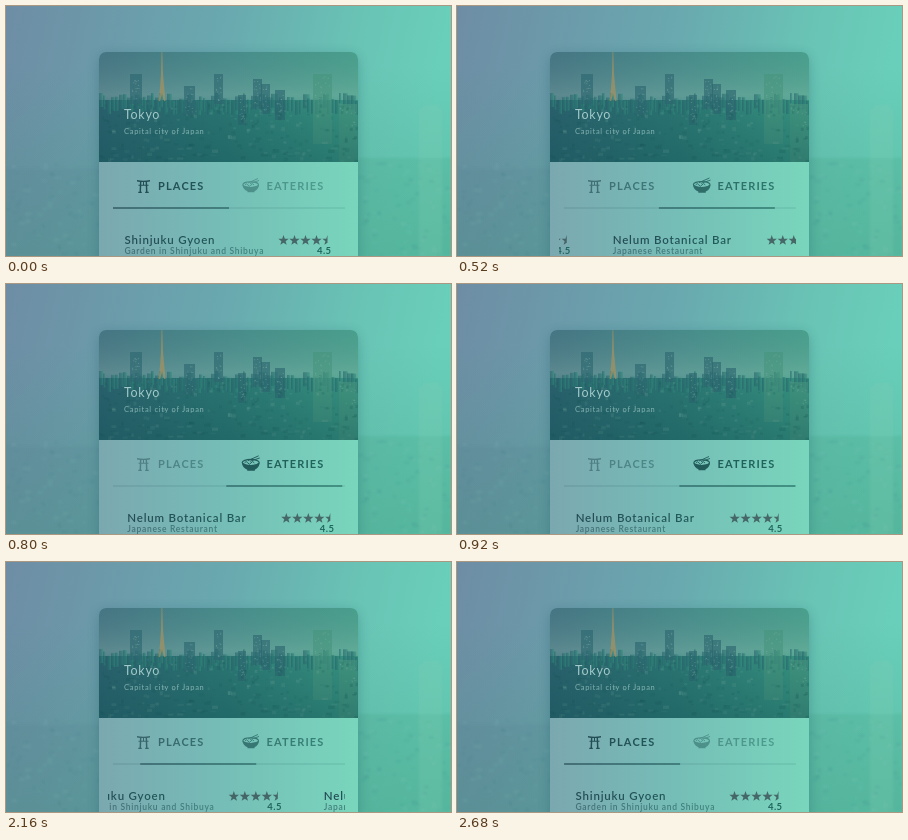
Animation, 445 px wide and 250 px high, one loop 2960 ms. Source, as an HTML page:

```html
<!DOCTYPE html>
<html lang="en">
<head>
<meta charset="utf-8">
<title>City card</title>
<style>
html, body { margin: 0; width: 100%; height: 100%; overflow: hidden; background: #6aa9af }
svg { display: block; width: 445px; height: 250px; font-family: Lato, sans-serif }
.ink { fill: url(#ink) }
.stroke { fill: none; stroke: url(#ink) }
.tab { font-size: 11px; font-weight: 700; letter-spacing: 1.15px }
.title { font-size: 11.5px; font-weight: 600; letter-spacing: .8px }
.sub { font-size: 8.5px; font-weight: 600; letter-spacing: .7px; opacity: .62 }
.score { font-size: 9.5px; font-weight: 700; letter-spacing: .4px }
</style>
</head>
<body>
<svg viewBox="0 0 445 250">
  <defs>
    <linearGradient id="back" x2="1" y2=".12">
      <stop stop-color="#6e8da5"/><stop offset=".5" stop-color="#69a9af"/>
      <stop offset=".8" stop-color="#69c4b5"/><stop offset="1" stop-color="#69cfba"/>
    </linearGradient>
    <linearGradient id="mist" x2="0" y2="1">
      <stop stop-color="#358c70" stop-opacity="0"/><stop offset="1" stop-color="#358c70" stop-opacity=".28"/>
    </linearGradient>
    <linearGradient id="body">
      <stop stop-color="#7ba8b0"/><stop offset=".5" stop-color="#75beb7"/><stop offset="1" stop-color="#79d6bc"/>
    </linearGradient>
    <linearGradient id="ink" gradientUnits="userSpaceOnUse" x1="93" x2="352">
      <stop stop-color="#244753"/><stop offset="1" stop-color="#1f6a5f"/>
    </linearGradient>
    <linearGradient id="sky">
      <stop stop-color="#4a7786"/><stop offset=".5" stop-color="#4d918f"/><stop offset="1" stop-color="#4fa891"/>
    </linearGradient>
    <linearGradient id="glow" x2="0" y2="1">
      <stop stop-color="#2a6a70" stop-opacity=".15"/><stop offset=".85" stop-color="#86aea4" stop-opacity=".3"/>
      <stop offset="1" stop-color="#86aea4" stop-opacity=".2"/>
    </linearGradient>
    <linearGradient id="ground">
      <stop stop-color="#2a606c"/><stop offset=".5" stop-color="#2b7673"/><stop offset="1" stop-color="#389480"/>
    </linearGradient>
    <linearGradient id="shade" x2="0" y2="1">
      <stop stop-color="#0f5054" stop-opacity="0"/><stop offset="1" stop-color="#0f5054" stop-opacity=".35"/>
    </linearGradient>
    <filter id="soft" x="-20%" y="-20%" width="140%" height="140%"><feGaussianBlur stdDeviation="6"/></filter>
    <filter id="haze"><feGaussianBlur stdDeviation=".8"/></filter>
    <filter id="blend"><feGaussianBlur stdDeviation=".5"/></filter>
    <clipPath id="photo"><path d="M93 156V53a7 7 0 0 1 7-7H345a7 7 0 0 1 7 7V156z"/></clipPath>
    <clipPath id="view"><path d="M102 205H339V250H102z"/></clipPath>
  </defs>

  <path fill="url(#back)" d="M0 0H445V250H0z"/>
  <path fill="url(#mist)" d="M0 60H445V250H0z"/>
  <g id="far" filter="url(#haze)"></g>
  <rect x="93" y="49" width="259" height="230" rx="7" fill="#1f5663" opacity=".32" filter="url(#soft)"/>
  <rect x="93" y="46" width="259" height="230" rx="7" fill="url(#body)"/>

  <g clip-path="url(#photo)">
    <path fill="url(#sky)" d="M93 46H352V156H93z"/>
    <path fill="url(#glow)" d="M93 46H352V96H93z"/>
    <path fill="url(#ground)" d="M93 94H352V156H93z"/>
    <g id="city" filter="url(#blend)"></g>
    <path fill="#a8925f" opacity=".7" d="M155.500 46h.8l.7 22 1.200 13 1.400 14h-1.600l-1.900-7-1.900 7h-1.600l1.500-14 .9-13z"/>
    <path fill="url(#shade)" d="M93 90H352V156H93z"/>
  </g>
  <g fill="#a2cac9">
    <text x="118" y="113" font-size="12.500" letter-spacing=".7">Tokyo</text>
    <text x="118" y="127.500" font-size="7.500" letter-spacing=".7" opacity=".75">Capital city of Japan</text>
  </g>

  <g id="places" class="ink">
    <g class="icon">
      <path d="M131 174q6.500 1.300 13 0v1.600q-6.500 1-13 0zM132.500 178.700h10v1.100h-10zM134 175.500h1.400l-.4 10.500h-1.500zM139.600 175.500h1.400l.5 10.500h-1.500zM137 175.500h1v3.500h-1zM132.300 185.700h3.500v1.200h-3.500zM139.200 185.700h3.500v1.200h-3.500z"/>
    </g>
    <text class="tab" x="152" y="184">PLACES</text>
  </g>
  <g id="eateries" class="ink">
    <g class="icon">
      <path d="M236.500 179q8 4 16.500 0-.5 4.500-4.500 6.300v1h-7v-1q-4.500-1.800-5-6.300z"/>
      <ellipse class="stroke" cx="244.700" cy="178.700" rx="7.800" ry="2.900" stroke-width="1.100"/>
      <path class="stroke" stroke-width=".9" d="M239 179q1.500-2.500 3 0t3 0 3 0M242 177l10-4.500M244 177.500l9-3"/>
    </g>
    <text class="tab" x="260.500" y="184">EATERIES</text>
  </g>

  <path class="ink" opacity=".22" d="M107 201.500H339v1H107z"/>
  <rect id="line" class="ink" y="201.200" width="116" height="1.600" opacity=".7"/>
  <g clip-path="url(#view)"><g id="list" class="ink"></g></g>
</svg>
<script>
const LOOP = 2960, OPEN = 286, BACK = 1966, PAGE = 249, TAB = 116;
const LIST_SPAN = 680, LINE_SPAN = 770;
const $ = id => document.getElementById(id);
const clamp = v => Math.min(1, Math.max(0, v));

let seed = 11;
const rnd = () => (seed = seed * 16807 % 2147483647) / 2147483647;
const rect = (x, y, w, h, fill, opacity) =>
  `<rect x="${x}" y="${y}" width="${w}" height="${h}" fill="${fill}" opacity="${opacity}"/>`;

function drawCity() {
  let s = '';
  for (let x = 93; x < 352; x += 4)
    s += rect(x, 87 + rnd() * 8, 2 + rnd() * 5, 14, 'url(#ground)', .6);
  const towers = [[124, 68, 12], [178, 80, 11], [208, 68, 9], [232, 89, 8], [247, 73, 9],
    [255, 78, 9], [269, 84, 10], [307, 68, 19], [333, 98, 18]];
  for (const [x, y, w] of towers) {
    s += rect(x, y, w, x > 300 ? 70 : 30, x > 300 ? '#47967f' : '#2d6870', .65);
    for (let i = 0; i < 14; i++)
      s += rect(x + 1 + rnd() * (w - 3), y + 2 + rnd() * 24, 1.2, 1, '#91bab1', .35);
  }
  for (let i = 0; i < 260; i++) {
    const depth = rnd();
    s += rect(93 + rnd() * 259, 96 + depth * 58, 2 + rnd() * 6 * depth, 1 + rnd() * 3,
      rnd() < .45 ? '#86b5a8' : '#14504f', .08 + rnd() * .16);
  }
  $('city').innerHTML = s;
}

function drawFar() {
  let s = rect(0, 162, 93, 88, '#50798a', .1) + rect(352, 152, 93, 98, '#3a9a78', .18) +
    rect(413, 103, 23, 147, '#86cdb2', .22) + rect(417, 99, 16, 4, '#86cdb2', .22);
  for (let i = 0; i < 160; i++)
    s += rect(rnd() < .5 ? rnd() * 92 : 353 + rnd() * 92, 155 + rnd() * 95, 2 + rnd() * 4, 1 + rnd() * 3,
      rnd() < .4 ? '#8cc0b8' : '#347784', .12);
  $('far').innerHTML = s;
}

function star(x, y, half) {
  const points = [];
  for (let i = 0; i < (half ? 6 : 10); i++) {
    const a = Math.PI * (1.5 - i / 5), r = i % 2 ? 2.2 : 5.4;
    points.push((x + r * Math.cos(a)).toFixed(2) + ',' + (y + r * Math.sin(a)).toFixed(2));
  }
  return `<polygon points="${points.join(' ')}" fill="#3d5659" opacity=".85"/>`;
}

function entry(x, title, sub) {
  let s = `<g transform="translate(${x})"><text class="title" x="118.500" y="238">${title}</text>
    <text class="sub" x="118.500" y="248">${sub}</text><text class="score" x="311" y="248">4.5</text>`;
  for (let i = 0; i < 5; i++) s += star(277.5 + i * 11, 234.500, i === 4);
  return s + '</g>';
}

// Cubic Bézier (.1, .8, .33, 1): a quick start and a long tail
function ease(p) {
  if (p <= 0 || p >= 1) return clamp(p);
  const curve = (u, a, b) => 3 * u * (1 - u) ** 2 * a + 3 * u * u * (1 - u) * b + u ** 3;
  let lo = 0, hi = 1;
  for (let i = 0; i < 20; i++) {
    const mid = (lo + hi) / 2;
    if (curve(mid, .1, .33) < p) lo = mid; else hi = mid;
  }
  return curve(lo, .8, 1);
}

function setTab(id, on, x, since) {
  $(id).setAttribute('opacity', .48 + .52 * on);
  const size = 1 + .22 * Math.sin(Math.PI * clamp((since - 200) / 360));
  $(id).querySelector('.icon').setAttribute('transform',
    `translate(${x} 180.500) scale(${size}) translate(${-x} -180.500)`);
}

function frame(now) {
  const t = now % LOOP, out = t - OPEN, back = t - BACK;
  const slide = span => ease(out / span) - ease(back / span);
  const fade = since => clamp((since - 60) / 260);
  const on = fade(out) - fade(back);
  $('list').setAttribute('transform', `translate(${-PAGE * slide(LIST_SPAN)})`);
  $('line').setAttribute('x', 107 + TAB * slide(LINE_SPAN));
  setTab('places', 1 - on, 137.5, back);
  setTab('eateries', on, 244.5, out);
  requestAnimationFrame(frame);
}

drawCity();
drawFar();
$('list').innerHTML = entry(0, 'Shinjuku Gyoen', 'Garden in Shinjuku and Shibuya') +
  entry(PAGE, 'Nelum Botanical Bar', 'Japanese Restaurant');
requestAnimationFrame(frame);
</script>
</body>
</html>
```
